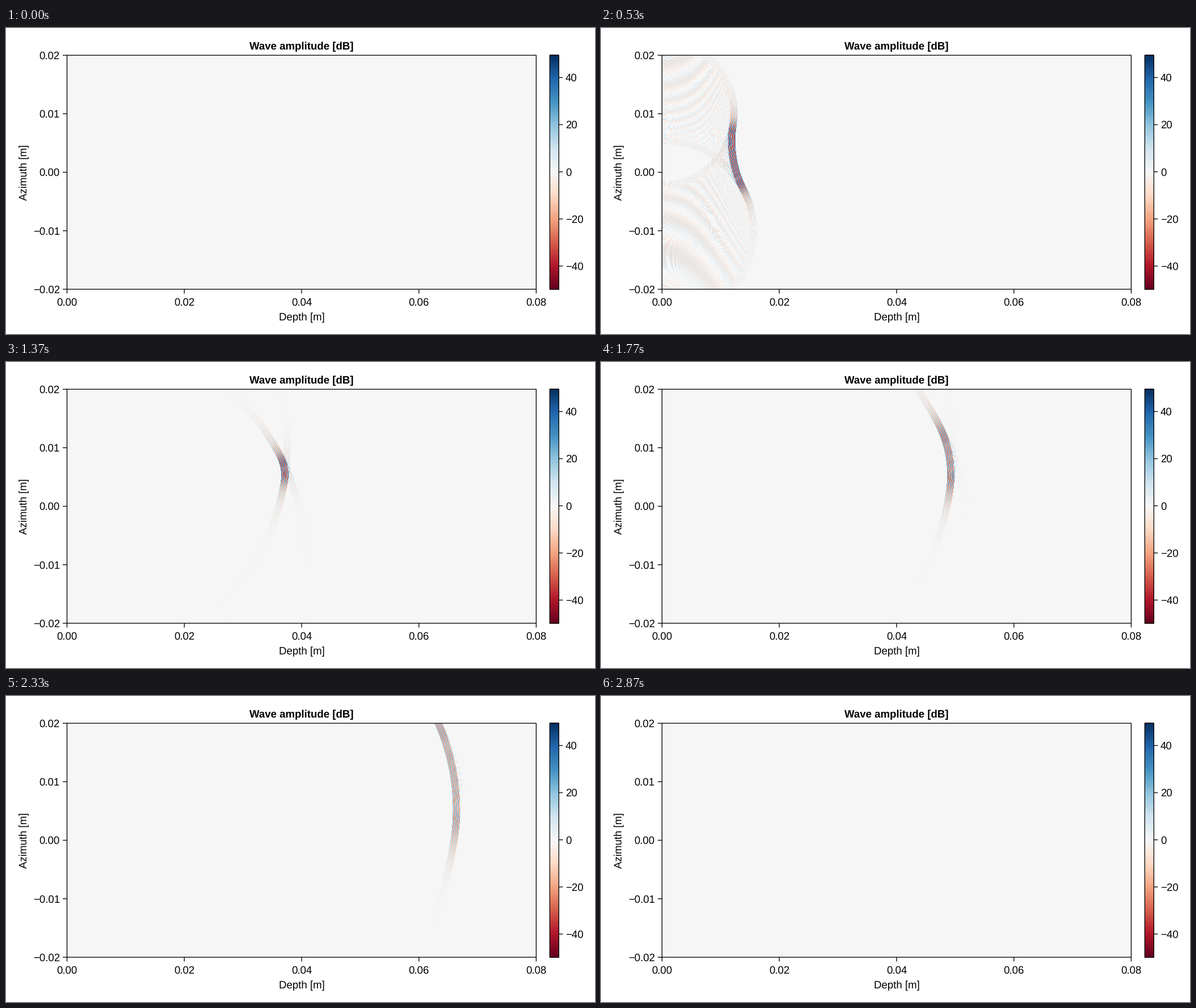
Write a matplotlib script that moves like this. It is 1038 px wide and 540 px high and loops after 3000 ms.

```python
import numpy as np
import matplotlib.pyplot as plt
from matplotlib.animation import FuncAnimation
from matplotlib.patches import Rectangle

STAGE_W, STAGE_H, DPI = 1038, 540, 64
PT = 72 / DPI                      # points per pixel
FRAMES, INTERVAL = 150, 20         # 3000 ms
STEPS_PER_MS = 0.03
LAST_STEP = 86                     # the pulse has left the stage

# Plot area in pixels
LEFT, RIGHT, TOP, BOTTOM = 108, 934, 48, 461
W, H = RIGHT - LEFT, BOTTOM - TOP
CELL = 0.08 / W                    # metres per pixel

# Focused linear array sending a short tone burst
COUNT = 128
FOCUS = (0.03, 0.0053)
ADVANCE = 0.00101                  # metres travelled per step
WAVELENGTH = 0.000308
CYCLES = 4
LENGTH = CYCLES * WAVELENGTH
GAIN = 1 / (8 * np.pi)

elements = np.linspace(-0.01, 0.01, COUNT)
focal_dist = np.hypot(FOCUS[0], FOCUS[1] - elements)
delay = focal_dist.max() - focal_dist
rows = 0.02 - (np.arange(H) + 0.5) * CELL
dy2 = (rows[None, :] - elements[:, None]) ** 2

TABLE = 4096
phase = 2 * np.pi * CYCLES * (np.arange(TABLE) + 0.5) / TABLE
pulse = (GAIN * np.cos(phase)).astype(np.float32)


def first_col(radius):
    """First pixel column outside a circle of this radius, per element and row."""
    x = np.sqrt(np.maximum(radius[:, None] ** 2 - dy2, 0))
    return np.clip(np.ceil(x / CELL - 0.5), 0, W).astype(np.int32)


def wave(step):
    """Signed amplitude in dB; everything below 0 dB is silent."""
    if step <= 0 or step >= LAST_STEP:
        return np.zeros((H, W), np.float32)
    front = np.maximum(ADVANCE * step - delay, 0)
    start = first_col(np.maximum(front - LENGTH, 0)).ravel()
    stop = first_col(front).ravel()
    count = np.where(np.repeat(front > 0, H), np.maximum(stop - start, 0), 0)

    # One entry for every pixel that lies inside an element's pulse
    pair = np.repeat(np.arange(COUNT * H, dtype=np.int32), count)
    begin = start - (np.cumsum(count) - count)
    col = np.arange(pair.size) + begin[pair]
    x = ((col + 0.5) * CELL).astype(np.float32)
    r = np.sqrt(x * x + dy2.astype(np.float32).ravel()[pair])
    lead = np.repeat(front.astype(np.float32), H)[pair]
    index = ((lead - r) * (TABLE / LENGTH)).astype(np.int32)
    value = pulse[np.clip(index, 0, TABLE - 1)] / r

    total = np.bincount((pair % H) * W + col, value, minlength=H * W)
    db = np.sign(total) * 20 * np.log10(np.maximum(np.abs(total), 1))
    return db.reshape(H, W).astype(np.float32)


plt.rcParams.update({"font.family": "Liberation Sans", "text.hinting": "none"})
fig = plt.figure(figsize=(STAGE_W / DPI, STAGE_H / DPI), dpi=DPI,
                 facecolor="white")
ax = fig.add_axes([0, 0, 1, 1])
ax.axis("off")

LINE = 1.33
VMIN, VMAX = -49.9, 49.5
look = dict(cmap="RdBu", vmin=VMIN, vmax=VMAX, aspect="auto")


def box(x0, y0, x1, y1):
    ax.add_patch(Rectangle((x0, y0), x1 - x0, y1 - y0, fill=False, snap=False,
                           ec="black", lw=LINE * PT, zorder=3))


def tick(x0, y0, x1, y1):
    ax.plot([x0, x1], [y0, y1], color="black", lw=LINE * PT, snap=False,
            solid_capstyle="butt", zorder=3)


def label(x, y, text, ha="center", **kw):
    ax.text(x, y, text, ha=ha, va="baseline", fontsize=18.67 * PT,
            color="black", **kw)


def number(v, digits):
    return f"{v:.{digits}f}".replace("-", "\u2212")


# Wave field
image = ax.imshow(np.zeros((H, W), np.float32), interpolation="nearest",
                  extent=(LEFT, RIGHT, BOTTOM, TOP), **look)
EDGE = (107.5, 48.1, 934.4, 461)
box(*EDGE)
for k in range(5):
    x = EDGE[0] + k * (EDGE[2] - EDGE[0]) / 4
    tick(x, EDGE[3], x, EDGE[3] + 7.5)
    label(x, 490, number(0.02 * k, 2))
    y = EDGE[1] + k * (EDGE[3] - EDGE[1]) / 4
    tick(EDGE[0] - 7.5, y, EDGE[0], y)
    label(94.8, y + 6.6, number(0.02 - 0.01 * k, 2), ha="right")

# Colour scale
BAR = (958.3, 47.9, 974.3, 461.3)
ax.imshow(np.linspace(VMAX, VMIN, 414)[:, None], interpolation="nearest",
          extent=(BAR[0], BAR[2], BAR[3], BAR[1]), **look)
box(*BAR)
for v in range(-40, 41, 20):
    y = BAR[3] - (v - VMIN) / (VMAX - VMIN) * (BAR[3] - BAR[1])
    tick(BAR[2], y, BAR[2] + 7, y)
    label(985.8, y + 6.6, number(v, 0), ha="left")

label(521, 38.2, "Wave amplitude [dB]", weight="bold")
label(521, 515.8, "Depth [m]")
label(37, 254.8, "Azimuth [m]", rotation=90, rotation_mode="anchor")

ax.set_xlim(0, STAGE_W)
ax.set_ylim(STAGE_H, 0)

cache = {}


def update(i):
    t = (i + 0.5) * INTERVAL
    step = min(int((t + 5) * STEPS_PER_MS), LAST_STEP)
    if step not in cache:
        cache[step] = wave(step).astype(np.float16)
    image.set_data(cache[step].astype(np.float32))
    return [image]


def reset():
    return update(0)


anim = FuncAnimation(fig, update, frames=FRAMES, init_func=reset,
                     interval=INTERVAL, repeat=True, repeat_delay=0)
plt.show()
```
